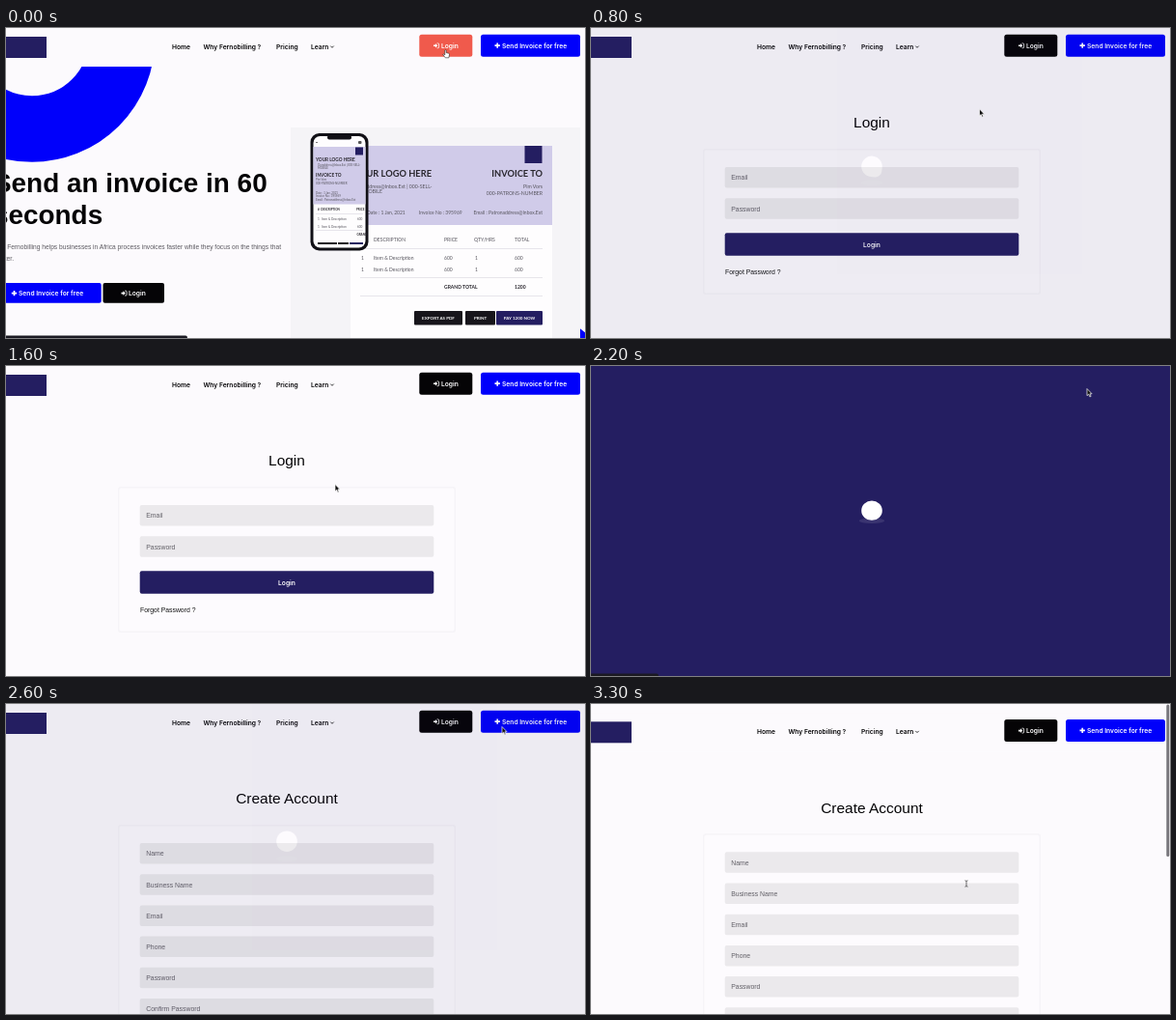
Write an HTML page that moves like this. It is 600 by 321 pixels and loops after 3.4 s.

```html
<!DOCTYPE html>
<html lang="en">
<head>
<meta charset="utf-8">
<title>Invoice site walkthrough</title>
<style>
  html, body { margin: 0; width: 100%; height: 100%; overflow: hidden; background: #fcfafd; }
  svg { display: block; width: 100%; height: 100%; }
  text { font-family: "Liberation Sans", Arial, sans-serif; white-space: pre; }
  .ui { font-family: Inter, "Liberation Sans", sans-serif; font-weight: 600; }
  .doc { font-family: Lato, sans-serif; }
  .bold { font-weight: 700; }
</style>
</head>
<body>
<svg id="stage" viewBox="0 0 600 321" preserveAspectRatio="none" xmlns="http://www.w3.org/2000/svg"></svg>
<script>
const LOOP = 3400, STEP = 100;
const PAPER = '#fcfafd', NAVY = '#241e61', BLUE = '#0000fb', BLACK = '#050406', LAVENDER = '#d0cbe9', INK = '#29272e', GREY = '#57555e';

const rect = (x, y, w, h, fill, r = 0, extra = '') =>
  `<rect x="${x}" y="${y}" width="${w}" height="${h}" rx="${r}" fill="${fill}" ${extra}/>`;
const text = (x, y, size, str, fill = BLACK, cls = '', anchor = 'start') =>
  `<text x="${x}" y="${y}" font-size="${size}" fill="${fill}" class="${cls}" text-anchor="${anchor}">${str.replace(/&/g, '&amp;')}</text>`;
const rule = (x, y, w) => rect(x, y, w, 0.5, '#cfcdd6');
const group = (id, body) => `<g id="${id}">${body}</g>`;
const ui = (x, y, str, fill = BLACK) => text(x, y, 6.7, str, fill, 'ui');
const doc = (x, y, size, str, anchor) => text(x, y, size, str, GREY, 'doc', anchor);
const docBold = (x, y, size, str, anchor) => text(x, y, size, str, INK, 'doc bold', anchor);

const plusIcon = (x, y) =>
  `<path d="M${x} ${y}h5.4M${x + 2.7} ${y - 2.7}v5.4" stroke="#fff" stroke-width="1.7"/>`;
const loginIcon = (x, y) =>
  `<path d="M${x} ${y - 0.8}h1.9v-1.5l2.4 2.3-2.4 2.3v-1.5h-1.9z" fill="#fff"/>
   <path d="M${x + 3.6} ${y - 2.4}h1.2q.8 0 .8.8v3.2q0 .8-.8.8h-1.2" fill="none" stroke="#fff" stroke-width=".8"/>`;

function header() {
  return rect(0, 0, 600, 40, PAPER)
    + rect(0, 9, 42, 22, NAVY)
    + ui(172, 22, 'Home') + ui(204.5, 22, 'Why Fernobilling ?') + ui(280, 22, 'Pricing') + ui(316, 22, 'Learn')
    + `<path d="M336.3 18.6l1.7 1.7 1.7-1.7" fill="none" stroke="${BLACK}" stroke-width=".8"/>`
    + rect(428.3, 6.7, 55, 23, BLACK, 2.5, 'id="loginButton"') + loginIcon(443, 18.3) + ui(451, 20.8, 'Login', '#fff')
    + rect(492, 6.7, 103, 23, BLUE, 2.5) + plusIcon(506.5, 18.1) + ui(514, 20.8, 'Send Invoice for free', '#fff');
}

function invoice() {
  const row = (y) => doc(368, y, 5, '1') + doc(381, y, 5, 'Item & Description')
    + doc(454, y, 5, '600') + doc(486, y, 5, '1') + doc(527, y, 5, '600');
  const button = (x, w, label, fill) => rect(x, 293, w, 14.5, fill, 1)
    + text(x + w / 2, 302.2, 4.5, label, '#fff', 'doc bold', 'middle');
  return rect(295, 103, 300, 218, '#f5f4f7')
    + rect(357, 122, 209, 199, '#fefdfe') + rect(357, 122, 209, 82, LAVENDER)
    + rect(537.5, 122, 18, 18, NAVY)
    + docBold(441, 154, 9.3, 'YOUR LOGO HERE', 'end') + docBold(556, 154, 9.3, 'INVOICE TO', 'end')
    + doc(441.5, 165.7, 5.2, 'Ouraddress@Inbox.Ext | 000-SELL-', 'end') + doc(390, 171, 5.2, 'MOBILE', 'end')
    + doc(556, 166, 5.2, 'Pim Vors', 'end') + doc(556, 173, 5.2, '000-PATRONS-NUMBER', 'end')
    + doc(374, 192.5, 5, 'Date : 1 Jan, 2021') + doc(428, 192.5, 5, 'Invoice No : 395969')
    + doc(556, 192.5, 5, 'Email : Patronaddress@Inbox.Ext', 'end')
    + doc(381, 221.3, 5.1, 'DESCRIPTION') + doc(454, 221.3, 5.1, 'PRICE')
    + doc(485, 221.3, 5.1, 'QTY/HRS') + doc(527, 221.3, 5.1, 'TOTAL')
    + rule(367, 228, 189) + row(239.5) + row(252.3) + rule(367, 258, 189)
    + docBold(454, 269.7, 5, 'GRAND TOTAL') + docBold(527, 269.7, 5, '1200') + rule(367, 277, 189)
    + button(423, 50, 'EXPORT AS PDF', '#17151b') + button(476, 31, 'PRINT', '#17151b') + button(508, 48, 'PAY 1200 NOW', NAVY);
}

function phone() {
  const row = (y) => doc(323, y, 3.1, '1') + doc(327, y, 3.1, 'Item & Description') + doc(364, y, 3.1, '600');
  return rect(315.5, 109, 60, 121.5, '#111016', 9)
    + rect(318.5, 112, 54, 115.5, '#fefdfe', 7) + rect(333, 111, 25, 4.5, '#111016', 2)
    + rect(321, 118, 2, 0.8, '#555') + rect(365, 117, 3.5, 3, '#555', 1)
    + rect(318.5, 123, 54, 59.5, LAVENDER) + rect(362, 123.5, 8, 8, NAVY)
    + docBold(321, 138, 4.7, 'YOUR LOGO HERE')
    + doc(323, 142.5, 2.9, 'Ouraddress@Inbox.Ext | 000-SELL-') + doc(323, 146, 2.9, 'MOBILE')
    + docBold(321, 153.5, 4.7, 'INVOICE TO')
    + doc(321, 158, 2.9, 'Pim Vors') + doc(321, 161.5, 2.9, '000-PATRONS-NUMBER')
    + doc(321, 171.5, 2.9, 'Date : 1 Jan, 2021') + doc(321, 175.2, 2.9, 'Invoice No : 395969')
    + doc(321, 178.9, 2.9, 'Email : Patronaddress@Inbox.Ext')
    + docBold(323, 189.3, 3, '#  DESCRIPTION') + docBold(363, 189.3, 3, 'PRICE') + rule(321, 192, 49)
    + row(198.7) + row(206.5) + rule(321, 209.5, 49) + docBold(363.5, 215.2, 3, 'GRAND')
    + rect(323, 222, 20, 2, '#17151b') + rect(344, 222, 11, 2, '#17151b') + rect(356, 222, 14, 2, NAVY);
}

function home() {
  return `<circle cx="27" cy="11.5" r="93" fill="none" stroke="${BLUE}" stroke-width="68.6"/>
    <circle cx="575" cy="339" r="34.4" fill="${BLUE}"/>`
    + text(-13, 169.7, 27.9, 'Send an invoice in 60', BLACK, 'bold') + text(-13, 203.2, 27.9, 'seconds', BLACK, 'bold')
    + text(285, 228.5, 6.65, 'Fernobilling helps businesses in Africa process invoices faster while they focus on the things that', '#5c5a61', '', 'end')
    + text(8, 241, 6.65, 'matter.', '#5c5a61', '', 'end')
    + rect(-13, 264, 111.7, 20.8, BLUE, 2) + plusIcon(5.8, 274.6) + ui(13, 277.2, 'Send Invoice for free', '#fff')
    + rect(100.5, 264, 63.5, 20.8, BLACK, 2) + loginIcon(119.5, 274.6) + ui(127, 277.2, 'Login', '#fff')
    + invoice() + phone();
}

const card = (h) => rect(116, 125, 350, h + 2, '#f6f4f8', 2.5) + rect(117.5, 126.5, 347, h - 1, '#fdfbfe', 2);
const title = (str) => text(291, 103.3, 15.45, str, BLACK, '', 'middle');
const fields = (labels) => labels.map((label, i) => {
  const y = 144 + i * 32.2;
  return rect(138.7, y, 304.6, 21.5, '#ebe9ec', 2) + text(145.3, y + 13.3, 6.87, label, '#626067');
}).join('');

const loginPage = () => title('Login') + card(149) + fields(['Email', 'Password'])
  + rect(138.7, 212.3, 304.6, 23.5, NAVY, 2)
  + text(291, 226.7, 6.7, 'Login', '#fff', 'ui', 'middle')
  + text(139, 254.8, 6.85, 'Forgot Password ?', '#111');

const signupPage = () => title('Create Account') + card(300)
  + fields(['Name', 'Business Name', 'Email', 'Phone', 'Password', 'Confirm Password']);

// Pointer shapes have their hot spot at 0,0.
const pointers = {
  arrow: '<path d="M0 0v7.2l1.7-1.5 1.2 2.7 1.2-.5-1.2-2.6h2.2z" fill="#111" stroke="#fff" stroke-width=".7"/>',
  hand: '<path d="M-.7 0q.7-.8 1.4 0v2.6l2.5.6q1 .3.8 1.3l-.6 3.3h-3.6l-2.6-3.2q.3-1 1.3-.3l.8.6z" fill="#fff" stroke="#222" stroke-width=".6"/>',
  beam: '<path d="M-1.5-3.2q1.5 0 1.5.8 0-.8 1.5-.8M0-2.4v4.8M-1.5 3.2q1.5 0 1.5-.8 0 .8 1.5.8" fill="none" stroke="#333" stroke-width=".7"/>'
};

const stage = document.getElementById('stage');
stage.innerHTML = rect(0, 0, 600, 321, PAPER)
  + group('page', group('home', home()) + group('login', loginPage()) + group('signup', signupPage()) + header())
  + rect(596.3, 0.5, 3, 157.5, '#77757b', 1.5, 'id="scrollbar"')
  + group('loader', rect(0, 0, 600, 321, NAVY)
    + '<ellipse id="shadow" cx="291" cy="160.3" ry="2.8" fill="#fff" opacity=".1"/><path id="ball" fill="#fff"/>')
  + '<path id="status" fill="#1b1a22"/>'
  + Object.entries(pointers).map(([id, shape]) => group(id, shape)).join('');

const el = Object.fromEntries([...stage.querySelectorAll('[id]')].map(node => [node.id, node]));
const show = (node, on) => node.setAttribute('display', on ? 'inline' : 'none');

// Linear interpolation through [time, ...values] keys.
function track(keys, t) {
  const i = keys.findIndex(k => k[0] > t);
  if (i < 0) return keys[keys.length - 1].slice(1);
  if (i === 0) return keys[0].slice(1);
  const a = keys[i - 1], b = keys[i], u = (t - a[0]) / (b[0] - a[0]);
  return a.slice(1).map((v, n) => v + (b[n + 1] - v) * u);
}

const pointerPath = [
  [0, 455.5, 23], [200, 455, 24], [300, 451, 25.5], [600, 450.5, 25.5], [900, 378.5, 113], [1300, 346, 216],
  [1400, 344, 210], [1600, 341, 122.5], [1800, 514, 23.5], [2700, 514, 23.5], [3000, 420, 160], [3200, 389, 186]
];
const fade = [
  [299, 0], [300, 1], [600, 1], [700, 0.45], [800, 0.065], [900, 0],
  [1999, 0], [2000, 1], [2400, 1], [2500, 0.45], [2600, 0.065], [2700, 0]
];
const overscroll = [[3000, 0], [3300, 9.3]];

function drawBall(phase) {
  const r = 10.8, bounce = 1 - Math.abs(1 - 2 * phase);
  const [c] = track([[0, r], [0.17, 1.3], [0.5, r]], phase);
  el.ball.setAttribute('d', `M${-r} 0A${r} ${r} 0 0 1 ${r} 0V${r - c}A${c} ${c} 0 0 1 ${r - c} ${r}H0A${r} ${r} 0 0 1 ${-r} 0Z`);
  el.ball.setAttribute('transform',
    `translate(291 ${142.2 + 7.5 * bounce}) scale(1 ${1 - 0.06 * bounce}) rotate(${90 * phase})`);
  el.shadow.setAttribute('rx', 11 + 2.2 * bounce);
}

function pointerKind(t, y) {
  if (t < 300 || (t >= 1800 && t < 2000)) return 'hand';
  if (t >= 1000 && t < 1600) {
    if (y > 212) return 'hand';
    if ((y > 144 && y < 166) || (y > 176 && y < 198)) return 'beam';
  }
  return t >= 3100 ? 'beam' : 'arrow';
}

function render(t) {
  const first = t < 2000;
  show(el.home, t < 300);
  show(el.login, t >= 300 && first);
  show(el.signup, !first);
  el.loginButton.setAttribute('fill', t < 300 ? '#f05a4c' : BLACK);

  el.page.setAttribute('transform', `translate(0 ${track(overscroll, t)[0]})`);
  show(el.scrollbar, t >= 3100);

  el.loader.setAttribute('opacity', track(fade, t)[0]);
  const phase = first ? 0.2 + (t - 500) * 0.00625 : 0.5 + (t - 2200) * 0.00625;
  drawBall(((phase % 1) + 1) % 1);

  const statusWidth = t < 700 ? 188 : 70;
  el.status.setAttribute('d', `M0 318.6H${statusWidth - 2}q2 0 2 2.4H0z`);
  show(el.status, t < 700 || (t >= 2000 && t < 2500));

  const [x, y] = track(pointerPath, t), kind = pointerKind(t, y);
  for (const id in pointers) show(el[id], id === kind);
  el[kind].setAttribute('transform', `translate(${x} ${y})`);
}

const start = performance.now();
function tick() {
  const t = (performance.now() - start) % LOOP;
  render(Math.floor(t / STEP) * STEP);
  requestAnimationFrame(tick);
}
tick();
</script>
</body>
</html>
```
